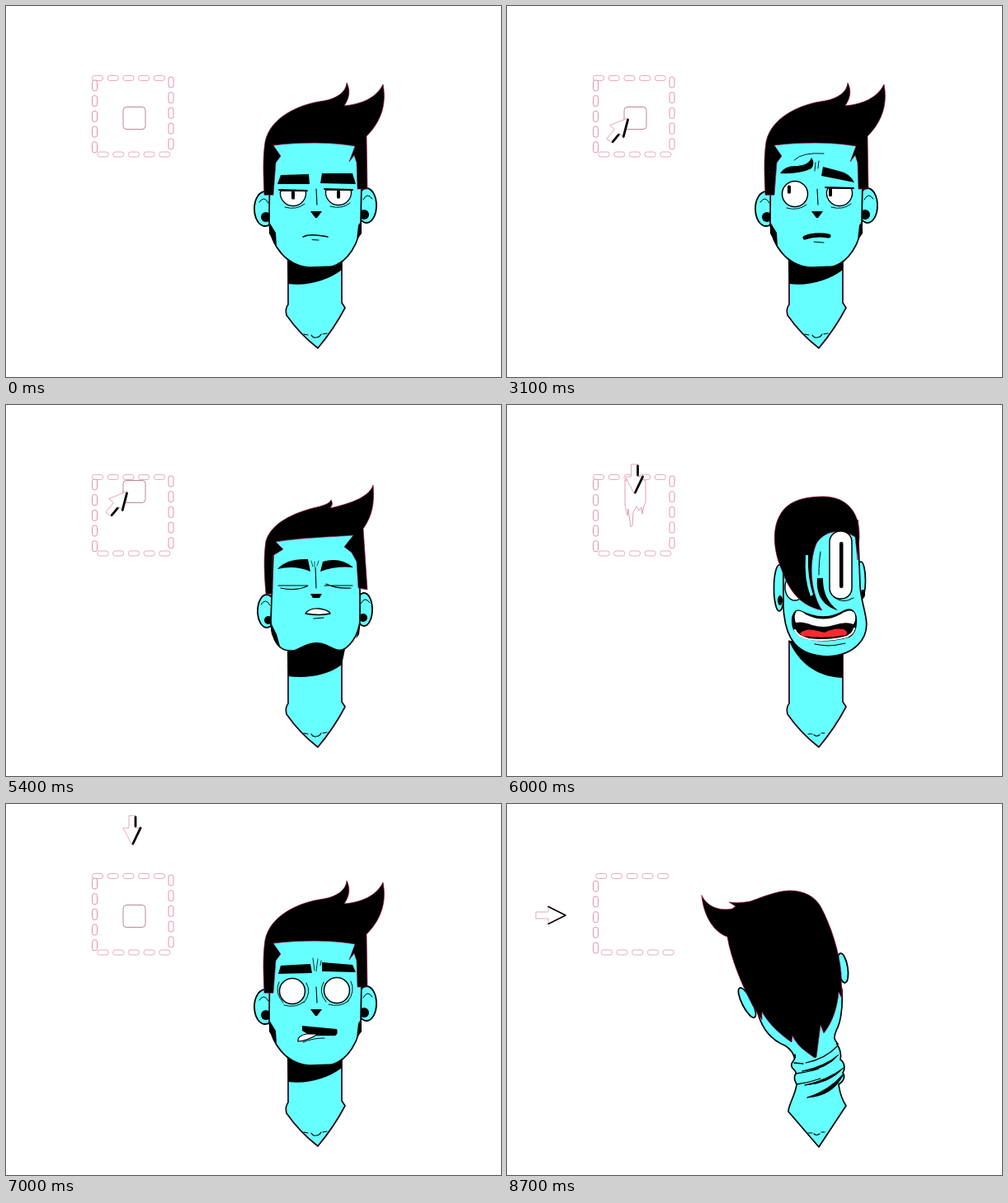
These frames come from a looping animation (600 by 450 pixels, 8800 ms). An HTML page:

```html
<!DOCTYPE html>
<html lang="en">
<head>
<meta charset="utf-8">
<title>Joystick head</title>
<style>
  html, body { margin: 0; width: 100%; height: 100%; overflow: hidden; background: #fff; }
  svg { display: block; width: 100vw; height: 100vh; }
</style>
</head>
<body>
<svg id="stage" viewBox="0 0 600 450"></svg>
<script>
const LOOP = 8800, STEP = 100;
const CYAN = '#66ffff', FRINGE = '#a01050', PALE = '#dc86aa';
const stage = document.getElementById('stage');

// Drawing helpers
const path = (d, fill = '#000', stroke = 'none', w = 1.6) =>
  `<path d="${d}" fill="${fill}" stroke="${stroke}" stroke-width="${w}" stroke-linejoin="round" stroke-linecap="round"/>`;
const line = (d, w = 1, color = '#000') => path(d, 'none', color, w);
const skin = d => path(d, CYAN, '#000', 1.7);
const hair = d => path(d, '#000', FRINGE, .7);
const oval = (x, y, rx, ry, fill = '#000', w = 0, rot = 0) =>
  `<ellipse cx="${x}" cy="${y}" rx="${rx}" ry="${ry}" fill="${fill}" stroke="#000" stroke-width="${w}" transform="rotate(${rot} ${x} ${y})"/>`;
const box = (x, y, w, h, r, fill = '#fff', stroke = 'none', sw = .7) =>
  `<rect x="${x}" y="${y}" width="${w}" height="${h}" rx="${r}" fill="${fill}" stroke="${stroke}" stroke-width="${sw}"/>`;
const group = (body, transform) => `<g transform="${transform}">${body}</g>`;

// Timing helpers
const lerp = (a, b, k) => a + (b - a) * k;
const ease = k => k * k * (3 - 2 * k);
function track(keys, t) {
  if (t <= keys[0][0]) return keys[0].slice(1);
  for (let i = 1; i < keys.length; i++) {
    const a = keys[i - 1], b = keys[i];
    if (t < b[0]) {
      const k = ease((t - a[0]) / (b[0] - a[0]));
      return a.slice(1).map((v, j) => lerp(v, b[j + 1], k));
    }
  }
  return keys[keys.length - 1].slice(1);
}
function morph([a, b], k) {
  const to = b.match(/[\d.]+/g);
  let i = 0;
  return a.replace(/[\d.]+/g, n => lerp(+n, +to[i++], k).toFixed(1));
}

// Each shape: level pose, head thrown back
const SHAPE = {
  hair: [
    'M313 229C312 205 311 185 314 165C320 135 355 119 385 115C402 112 412 104 413 93C418 103 416 112 410 121C432 119 449 111 457 95C461 116 457 138 437 158L438 222L426 222L425 190L422 181L416 189L423 170C395 165 355 165 324 169L333 182L327 190L324 229Z',
    'M315 229C313 205 312 185 315 165C322 142 350 131 372 125C385 122 392 120 394 115C396 119 396 121 393 125C425 118 441 109 445 97C447 118 444 135 433 150L438 224L427 222L425 190L419 179L410 172L421 158C395 160 355 161 327 166L336 175L323 183L323 229Z'],
  face: [
    'M320 165L319 262C320 290 340 316 368 317L396 316C414 310 429 288 430 262L432 165Z',
    'M325 152L321 262C322 288 332 298 345 298L404 298C416 296 427 280 429 262L429 152Z'],
  shade: [
    'M341 306C352 315 362 317 372 317C390 318 400 315 407 309L407 320C390 333 365 340 342 337Z',
    'M341 299C352 299 362 288 376 288C390 287 398 300 411 296L407 315C390 328 365 332 342 329Z'],
  beard: [
    'M319 262L319 276L328 291L327 275ZM431 260L431 276L425 284L427 266Z',
    'M320 262L322 278L333 296L328 278ZM430 262L428 278L415 297L424 284Z'],
  nose: [
    'M369 249L383 249L377 257L375 257Z',
    'M369 229L383 229L380 234L372 234Z'],
  ridge: ['M376 222L377 241', 'M375 197L376 222']
};

function eye(x, y, lid, pupil) {
  const r = 15.5, open = lid <= y - r;
  const h = open ? 0 : Math.sqrt(r * r - (y - lid) ** 2);
  let out = open ? oval(x, y, r, r, '#fff', 1.5)
    : path(`M${x - h} ${lid}A${r} ${r} 0 ${lid < y ? 1 : 0} 0 ${x + h} ${lid}Z`, '#fff', '#000', 1.4)
      + line(`M${x - 17} ${lid - 1}L${x + 17} ${lid}`, 1.8);
  if (pupil) out += box(pupil[0] - 2, Math.max(lid, pupil[1] - 5.5), 4, 10, 1.5, '#000');
  return out + line(`M${x - 10} ${y + 17}Q${x + 4} ${y + 21} ${x + 14} ${y + 13}`, .9);
}

const flatMouth = line('M360 280Q366 277 376 278T390 280', 1.5) + line('M371 283.5L379 284');

const MOOD = {
  calm: () => eye(348, 227, 224, [348, 230]) + eye(403, 226, 223, [403, 229])
    + path('M329 216L333 205L367 204L368 216ZM381 215L383 203L420 203L424 216Z') + flatMouth,
  look: ([dx, dy]) => eye(348, 227, 229, [349 + dx, 231 + dy]) + eye(403, 226, 226, [402 + dx, 230 + dy])
    + path('M329 219L335 207L372 206L374 217ZM379 217L380 206L418 206L424 219Z')
    + line('M374 195Q378 202 375 212M378 198Q381 204 378 211', .8) + flatMouth,
  worry: ([dx, dy]) => eye(349, 228, 210, [348 + dx, 228 + dy]) + eye(403, 227, 221, [398 + dx, 228 + dy])
    + path('M331 203Q337 193 352 194Q366 193 369 184Q374 190 369 197Q356 204 331 203ZM383 195L402 200Q416 203 421 214L381 206Z')
    + line('M348 187Q358 177 384 179M374 190L373 200M378 188L377 197', .9)
    + line('M361 281Q374 276 390 279', 5) + line('M372 286L384 287'),
  shut: () => path('M329 199Q340 186 366 187L369 202Q350 194 329 199ZM381 202L384 190Q405 184 421 197Q400 195 381 202Z')
    + line('M330 219L366 219M333 222Q350 226 365 220M386 219L420 219M388 217Q400 223 418 222', 1.1)
    + line('M370 189L372 196M374 190L374 196M379 189L377 195', .7)
    + path('M363 253Q367 246 380 247Q392 249 393 253Q380 256 363 253Z', '#fff', '#000', 1.5)
    + line('M373 259L385 258', 1.2),
  daze: () => eye(347, 227, 200) + eye(401, 226, 200)
    + line('M331 216Q325 229 336 241M364 217Q371 229 361 241M385 216Q378 228 388 240M418 215Q424 227 414 240', .9)
    + path('M330 206L333 196L369 194L371 205ZM383 203L383 192L420 195L424 204Z')
    + line('M372 187L374 202M378 188L376 203M382 190L381 196', .8)
    + path('M359 269L401 273Q403 279 399 281L369 281L359 275Z')
    + path('M354 288Q353 281 364 279L378 279Q366 287 354 288Z', '#fff', '#000', 1.2)
    + line('M360 289Q371 284 386 284', .9)
};

function frontHead(k, mood, gaze) {
  const s = name => morph(SHAPE[name], k);
  const ear = (a, b, dot, flip) => {
    const [x, y, rx, ry] = a.map((v, i) => lerp(v, b[i], k));
    return oval(x, y, rx, ry, CYAN, 1.8)
      + line(`M${x - flip * 7} ${y - 8}q${flip * 6} -9 ${flip * 11} 1`)
      + oval(lerp(dot[0], dot[2], k), lerp(dot[1], dot[3], k), 6 - k, 6 - k);
  };
  return ear([314, 246, 13, 21], [316, 250, 11, 20], [315, 256, 318, 261], 1)
    + ear([437, 242, 12, 21], [434, 248, 10, 20], [434, 253, 433, 258], -1)
    + skin(s('face')) + path(s('shade')) + path(s('beard')) + hair(s('hair'))
    + line(s('ridge'), 1.1) + path(s('nose')) + MOOD[mood](gaze);
}

const collar = line('M361 398L366 399M370 399Q372 403 376 402Q380 402 382 398M384 398L389 397', 1.1);
const tightCollar = line('M365 399L370 399M372 400Q375 403 379 400M381 398L385 398', 1.2);
const neck = path('M342 286L342 362Q338 367 340 375Q356 398 378 415Q398 391 411 366L407 360L407 286', CYAN, '#300014', 1.7);

const downHead =
  path('M342 286C350 306 370 330 407 331L407 298L350 286Z')
  + oval(330, 222, 6.5, 28, CYAN, 1.7) + oval(331, 237, 3, 6)
  + oval(429, 213, 5.5, 23, CYAN, 1.7) + oval(431.5, 229, 2.5, 5)
  + skin('M335 150L335 245C337 285 352 304 388 305C420 304 440 284 435 258C433 245 429 235 428 220L425 140Z')
  + oval(349, 221, 12, 16, '#fff', 1.4)
  + hair('M333 200C322 175 322 150 330 135C340 115 362 111 385 111C412 112 428 130 427 160L425 188L422 160C405 149 385 152 375 168C364 195 370 232 382 249C352 243 340 220 333 200Z')
  + box(391, 153, 27, 82, 13, '#fff', '#000', 1.5) + box(403, 166, 4.5, 56, 2, '#000')
  + line('M396 233Q407 242 420 234')
  + path('M362 182Q360 212 368 232L371 230Q364 210 365 182Z', CYAN)
  + path('M376 210L383 210C383 230 390 240 401 249C385 245 374 232 376 210Z')
  + line('M378 206Q378 190 380 178')
  + path('M346 258Q348 247 356 250Q385 264 408 250Q420 244 423 257Q425 275 415 281Q385 290 358 282Q344 275 346 258Z', '#000', '#000')
  + path('M351 250Q356 249 362 254Q384 265 404 254Q416 246 421 252Q424 260 420 266Q411 262 396 267Q384 271 370 267Q358 262 350 264Q347 256 351 250Z', '#fff')
  + path('M355 277Q362 271 372 273L385 276Q396 270 408 272Q414 275 411 279Q385 284 358 280Z', '#ff2830')
  + line('M349 273Q352 281 366 284Q390 287 412 281Q419 278 421 271', 2.2, '#fff')
  + line('M373 290Q390 294 410 289', 1.2);

const backSkull =
  oval(291, 241, 6, 20, CYAN, 1.8, -27) + oval(407, 199, 6, 18, CYAN, 1.8, -9)
  + skin('M303 250C309 275 322 287 337 293C346 299 349 305 350 318L401 291C396 285 396 283 399 275C406 262 407 245 406 225L380 150Z');
const backHair = hair('M236 111C243 125 258 130 273 127L277 124L269 119Q280 121 295 118C312 112 325 106 342 105C360 105 373 112 380 124C393 148 403 180 405 205L406 236L402 228C400 252 392 268 384 278L380 268L375 307L373 308C362 300 352 294 346 281L345 289C332 280 318 268 309 252L309 262L298 245C285 220 272 190 267 161C250 155 238 135 236 111Z');
const twistedNeck =
  skin('M349 304C351 311 343 313 345 318C345 322 351 322 350 327C346 333 350 337 351 340C350 352 341 365 341 373L378 416L411 366C405 357 403 348 402 340C409 336 410 330 407 326C411 320 408 312 404 310C406 302 403 296 400 291')
  + line('M348 314L359 315M350 327Q366 325 378 321M351 340Q366 338 380 333', 1.3)
  + path('M358 324Q386 318 402 304Q388 322 358 324ZM361 341Q388 335 408 320Q391 339 361 341ZM364 356Q390 348 408 327Q396 354 364 356Z', '#000', '#000', 1)
  + line('M362 314Q386 309 400 294', 1.2) + tightCollar;

// Joystick pad
const PITCH = 18.7;
function dashes(x, y, upright) {
  let out = '';
  for (let i = 0; i < 5; i++) {
    const d = i * PITCH;
    out += upright ? box(x, y + d, 6, 13, 2.6, '#fff', PALE, .9)
      : box(x + d, y, 13, 6, 2.6, '#fff', PALE, .7);
  }
  return out;
}
const knob = (x, y) => box(x - 13.5, y - 13.5, 27, 27, 4, '#fff', '#a86a84', .8);
const drip = path('M143 92L143 121L146 134L147 126L150 148L152 146L153 130L157 123L160 128L163 124L164 132L166 122L168 118L168 92Q156 84 143 92Z', '#fff', PALE, .8);

const KNOB = [[3600, 136], [3900, 105], [5400, 105], [5500, 140], [5700, 136], [5900, 136], [6200, 152], [6400, 132], [6600, 136]];

function pad(t) {
  const broken = t >= 8400, s = broken ? 3.3 : 0;
  let out = dashes(104.5 + s, 84.5, false) + dashes(111 + s, 177, false) + dashes(104.5, 90 + s, true);
  if (!broken) out += dashes(197, 86, true);
  if (t >= 5900 && t < 6200) return out + drip;
  if (!broken) return out + knob(155.5, track(KNOB, t)[0]);
  const k = (t - 8300) / 300;
  if (k > 1.1) return out;
  return out + group(dashes(197, 86, true), `translate(${k * 390} ${-k * 80}) rotate(${k * 25} 200 130)`)
    + group(knob(155.5, 136), `translate(${k * 420} ${-k * 115}) rotate(${k * 70} 155 136)`);
}

// Pointer: time, tip x, tip y, turn
const POINTER = [
  [1100, 468, 395, -27], [1400, 463, 350, -27], [1900, 463, 350, -27],
  [2700, 147, 136, 40], [3600, 147, 136, 40], [3900, 147, 105, 40], [5400, 147, 105, 40],
  [5600, 124, 92, 80], [5800, 155, 69, 180], [6000, 154.5, 108, 180], [6200, 154.5, 112, 180],
  [6700, 153, 44, 180], [6900, 153, 50, 180], [7100, 153, 50, 180], [7300, 100, 128, 100],
  [7700, 96, 135, 90], [8100, 98, 135, 90], [8300, 71, 135, 90], [8400, 143, 135, 90], [8600, 71, 135, 90]
];

function pointer(t) {
  if (t < 1100) return '';
  const [x, y, turn] = track(POINTER, t);
  const arrow = path('M0 0L11 21H4V36H-4V21H-11Z', '#fff', PALE, .7);
  const level = Math.abs(turn - 90) < 8;
  const dark = level ? line('M-10.5 21L0 0L10.5 21', 1.4)
    : group(line('M1 2L10 21M4 23V34', 2.8), `scale(${turn > 120 ? -1 : 1} 1)`);
  return group(arrow + dark, `translate(${x} ${y}) rotate(${turn})`);
}

const TILT = [[3600, 0], [3900, 1], [5400, 1], [5600, 0]];
const LEAN = [[5400, 0], [5600, 17], [5800, -4], [5900, 0], [6300, 0], [6400, 4], [6600, -2], [6800, 0]];
const GAZE = [[1100, 0, 0], [1400, 6, 5], [1900, 6, 5], [2600, -6, 2], [2800, -6, -5]];
const MOODS = [[0, 'calm'], [1200, 'look'], [2700, 'worry'], [3700, 'shut'], [5500, 'daze'], [7500, 'worry'], [8300, 'daze']];

function man(t) {
  if (t >= 5900 && t < 6300) return neck + tightCollar + downHead;
  if (t >= 8500) {
    const swing = `rotate(${t < 8600 ? -8 : t < 8700 ? 4 : 0} 374 310)`;
    return group(backSkull, swing) + twistedNeck + group(backHair, swing);
  }
  const mood = MOODS.filter(m => m[0] <= t).pop()[1];
  const head = frontHead(track(TILT, t)[0], mood, track(GAZE, t));
  const spin = t >= 8400 ? ' translate(376 0) scale(.45 1) translate(-376 0)' : '';
  return neck + collar + group(head, `rotate(${track(LEAN, t)[0]} 376 320)${spin}`);
}

function draw(now) {
  const t = Math.floor(now % LOOP / STEP) * STEP;
  if (t !== draw.last) {
    draw.last = t;
    stage.innerHTML = man(t) + pad(t) + pointer(t);
  }
}

let start;
function tick(now) {
  start ??= now;
  draw(now - start);
  requestAnimationFrame(tick);
}
draw(0);
requestAnimationFrame(tick);
</script>
</body>
</html>
```
